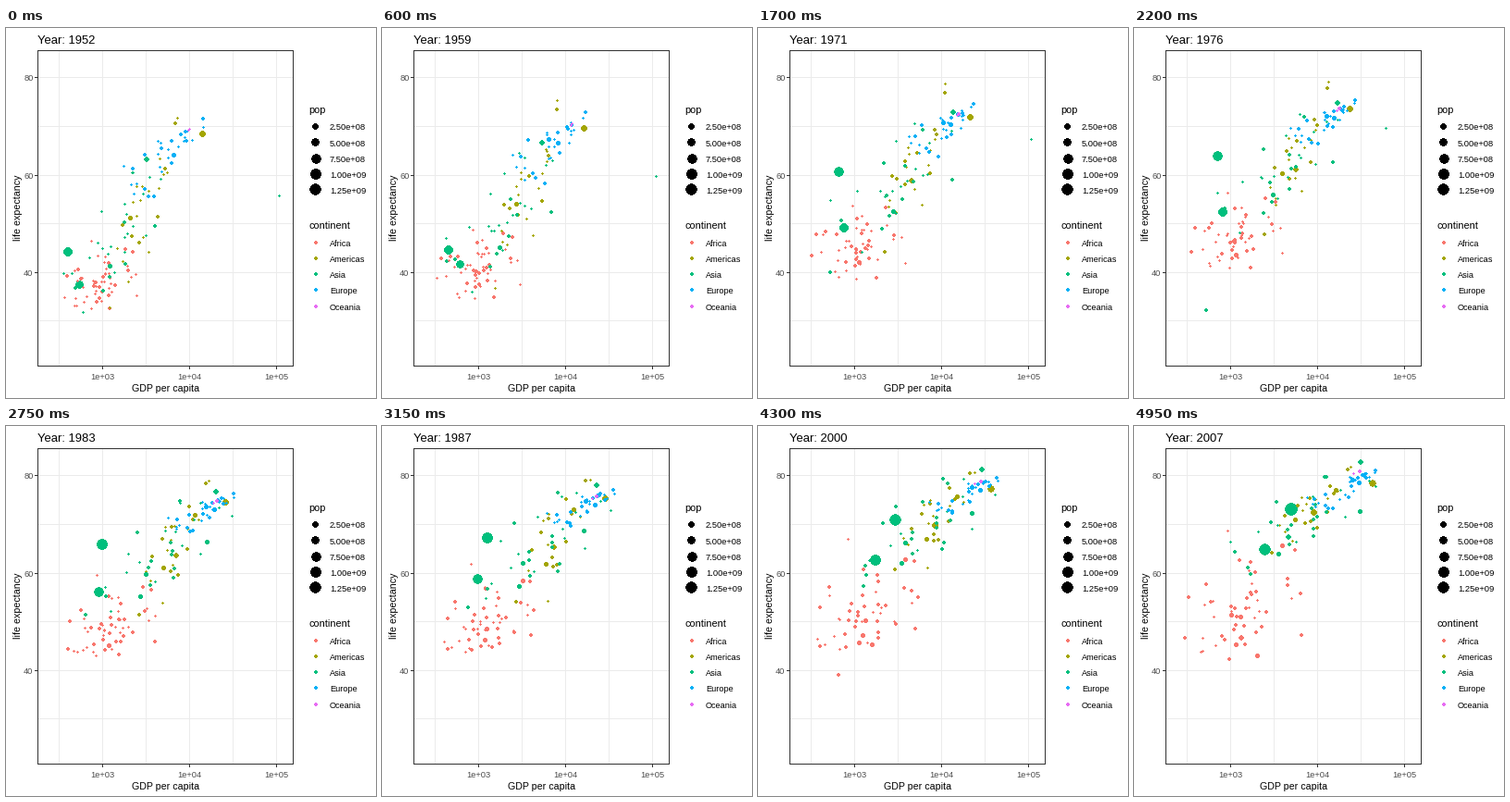
Animation, 400 px wide and 400 px high, one loop 5000 ms. Source, as a matplotlib script:

```python
import math

import matplotlib.pyplot as plt
import numpy as np
from matplotlib.animation import FuncAnimation

SIZE, DPI = 400, 72
FRAMES, INTERVAL = 100, 50
FIRST, LAST, STEP = 1952, 2007, 5
LEFT, TOP, RIGHT, BOTTOM = 34, 24, 310, 365

INK, GREY, GRID = "#333333", "#4D4D4D", "#EBEBEB"
COLORS = {"Africa": "#F8766D", "Americas": "#A3A500", "Asia": "#00BF7D",
          "Europe": "#00B0F6", "Oceania": "#E76BF3"}
POP_MIN, POP_MAX = 0.06, 1318.7  # millions

YEARS = np.arange(FIRST, LAST + 1, STEP)
T = (YEARS - FIRST) / (LAST - FIRST)

# Continent, number of dots, population growth, link of income and life span,
# then (log income, spread, life span, spread) at the start, middle and end.
CLOUDS = [
    ("Africa", 51, 3.6, .4,
     [(3.05, .26, 39, 4.8), (3.17, .32, 49.5, 5.5), (3.25, .42, 55, 9)]),
    ("Americas", 23, 2.5, .7,
     [(3.46, .22, 52.5, 8), (3.77, .22, 64.5, 6), (3.9, .26, 73, 3.6)]),
    ("Asia", 28, 2.6, .72,
     [(3.2, .32, 47, 8), (3.66, .42, 62.5, 6.5), (3.85, .5, 71, 5.2)]),
    ("Europe", 13, 1.35, .6,
     [(3.5, .2, 61, 4.5), (3.95, .17, 70, 2), (4.1, .17, 75, 1.5)]),
    ("Europe", 17, 1.25, .7,
     [(3.86, .16, 67.8, 3), (4.27, .11, 74, 1.4), (4.5, .09, 79.8, 1)]),
    ("Oceania", 2, 2.2, .5,
     [(4.01, .01, 69.2, .2), (4.28, .03, 74, .4), (4.47, .07, 80.7, .5)]),
]

# Dots that stand out: continent, first and last population,
# then key points of (year, income, life span).
LANDMARKS = [
    ("Asia", 556, 1318, [(1952, 400, 44), (1962, 488, 44.5), (1967, 613, 58.4),
                         (1977, 741, 64), (1992, 1656, 68.7), (2007, 4959, 73)]),
    ("Asia", 372, 1110, [(1952, 547, 37.4), (1962, 658, 43.6), (1987, 977, 58.6),
                         (2007, 2452, 64.7)]),
    ("Americas", 157, 301, [(1952, 13990, 68.4), (1967, 19530, 70.8),
                            (1977, 24073, 73.4), (2007, 42952, 78.2)]),
    ("Americas", 57, 190, [(1952, 2109, 50.9), (1982, 7031, 63.3), (2007, 9066, 72.4)]),
    ("Asia", 86, 127, [(1952, 3217, 63), (1972, 14779, 73.4), (1992, 26825, 79.4),
                       (2007, 31656, 82.6)]),
    ("Asia", .2, 2.5, [(1952, 108382, 55.6), (1972, 109348, 67.7), (1982, 31354, 71.3),
                       (2007, 47307, 77.6)]),
    ("Africa", 2.5, 8.9, [(1952, 493, 40), (1987, 848, 44), (1992, 737, 23.6),
                          (1997, 590, 36.1), (2007, 863, 46.2)]),
    ("Asia", 4.7, 14, [(1952, 368, 39.4), (1967, 523, 45.4), (1977, 525, 31.2),
                       (1982, 624, 51), (2007, 1714, 59.7)]),
]


def to_x(log_income):
    return 104.6 + 94.05 * (log_income - 3)


def to_y(life):
    return 365.3 - 5.255 * (life - 20.65)


def dot_size(pop):
    return 1 + 5 * np.sqrt((pop - POP_MIN) / (POP_MAX - POP_MIN))


def path(log_income, life, pop0, pop1):
    pop = np.clip(pop0 * (pop1 / pop0) ** T, POP_MIN, POP_MAX)
    return to_x(log_income), to_y(life), dot_size(pop)


def landmark_path(pop0, pop1, points):
    years, income, life = zip(*points)
    return path(np.interp(YEARS, years, np.log10(income)),
                np.interp(YEARS, years, life), pop0, pop1)


def cloud_paths(rng, count, growth, link, keys):
    """Dots keep their rank in a cloud that moves and spreads smoothly."""
    curves = np.polyfit([0, .5, 1], keys, 2)
    income, income_spread, life, life_spread = (np.polyval(c, T) for c in curves.T)
    for _ in range(count):
        wealth, health = np.clip(rng.normal(size=2), -1.9, 1.9)
        health = link * wealth + math.sqrt(1 - link ** 2) * health
        drift = rng.normal(0, .25) * np.sin(2 * np.pi * T)
        pop = np.clip(10 ** rng.normal(.95, .5), .3, 90)
        yield path(income + income_spread * (wealth + drift),
                   life + life_spread * (health - drift), pop / growth, pop)


def build_paths():
    rng = np.random.default_rng(7)
    paths, colors = [], []
    for continent, *shape in LANDMARKS:
        paths.append(landmark_path(*shape))
        colors.append(COLORS[continent])
    for continent, count, *shape in CLOUDS:
        paths.extend(cloud_paths(rng, count, *shape))
        colors += [COLORS[continent]] * count
    return np.array(paths), colors


def pixel_dots(x, y, size):
    """Centres and areas of discs that sit on whole pixels."""
    radius = 0.375 * (np.asarray(size) * 2.845 + 0.945)
    width = np.floor(2 * radius + 0.5)
    shift = width / 2 - np.floor(radius + 0.5)
    centres = np.column_stack([np.floor(x) + shift, np.floor(y) + shift])
    # Hard-edged fills cover every pixel they touch, so the disc is drawn smaller.
    return centres, (width - 1.62) ** 2


fig = plt.figure(figsize=(SIZE / DPI, SIZE / DPI), dpi=DPI, facecolor="white")
ax = fig.add_axes([0, 0, 1, 1])
ax.set(xlim=(0, SIZE), ylim=(SIZE, 0))
ax.axis("off")


def line(x0, y0, x1, y1, color, z=1):
    ax.plot([x0, x1], [y0, y1], color=color, lw=1, zorder=z,
            antialiased=False, solid_capstyle="projecting")


def text(x, y, label, size, color="black", **kw):
    return ax.text(x, y, label, fontsize=size, color=color, family="Liberation Sans", **kw)


def dots(x, y, size, colors):
    centres, areas = pixel_dots(x, y, size)
    return ax.scatter(centres[:, 0], centres[:, 1], s=areas, c=colors, linewidths=0,
                      antialiased=False, zorder=3)


def draw_axes():
    for power in np.arange(2.5, 5.1, .5):
        x = math.floor(to_x(power))
        line(x, TOP, x, BOTTOM, GRID)
        if power == int(power):
            line(x, BOTTOM + 1, x, BOTTOM + 3, INK)
            text(x, 380, f"1e+0{int(power)}", 9.3, GREY, ha="center")
    for life in range(30, 90, 10):
        y = round(to_y(life))
        line(LEFT, y, RIGHT, y, GRID)
        if life % 20 == 0:
            line(LEFT - 3, y, LEFT - 1, y, INK)
            text(29.5, y + 4, str(life), 9.2, GREY, ha="right")
    for y in (TOP, BOTTOM):
        line(LEFT, y, RIGHT, y, INK, 4)
    for x in (LEFT, RIGHT):
        line(x, TOP, x, BOTTOM, INK, 4)
    text(172.3, 393, "GDP per capita", 10.6, ha="center")
    text(18, 194.5, "life expectancy", 10.6, rotation=90, ha="right", va="center")


def draw_legends():
    text(327, 92, "pop", 11)
    pops = np.arange(250, 1251, 250)
    ys = 107 + 17.2 * np.arange(5)
    dots(np.full(5, 335.6), ys, dot_size(pops), "black")
    for pop, y in zip(pops, ys):
        text(350, y + 3.5, f"{pop * 1e6:.2e}", 9.4)
    text(327, 217, "continent", 11)
    ys = ys + 125.3
    dots(np.full(5, 335.6), ys, np.full(5, 1.5), list(COLORS.values()))
    for name, y in zip(COLORS, ys):
        text(350, y + 3.5, name, 9.1)


draw_axes()
draw_legends()
title = text(34, 17, "", 13)
paths, dot_colors = build_paths()
bubbles = dots(*paths[:, :, 0].T, dot_colors)


def update(frame):
    progress = frame / (FRAMES - 1)
    pos = progress * (len(YEARS) - 1)
    key = min(int(pos + 1e-9), len(YEARS) - 2)
    mix = pos - key
    x, y, size = ((1 - mix) * paths[:, :, key] + mix * paths[:, :, key + 1]).T
    centres, areas = pixel_dots(x, y, size)
    bubbles.set_offsets(centres)
    bubbles.set_sizes(areas, DPI)
    title.set_text(f"Year: {round(FIRST + (LAST - FIRST) * progress)}")
    return bubbles, title


anim = FuncAnimation(fig, update, frames=FRAMES, interval=INTERVAL, repeat=True, repeat_delay=0)
plt.show()
```
